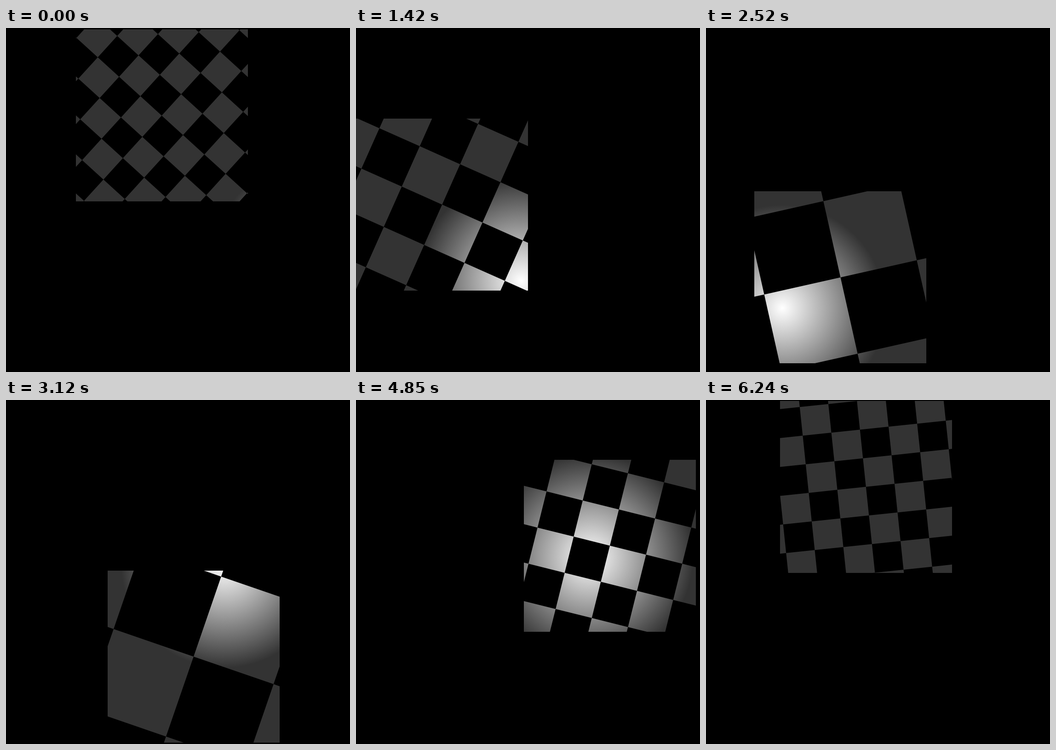
Write an HTML page with a canvas that moves like this. It is 748x748 px and loops after 6.27 s.

```html
<!DOCTYPE html>
<html>
<head>
<meta charset="utf-8">
<style>
html, body { margin: 0; width: 100%; height: 100%; overflow: hidden; background: #000; }
canvas { display: block; }
</style>
</head>
<body>
<canvas id="stage" width="748" height="748"></canvas>
<script>
const ctx = document.getElementById('stage').getContext('2d');
const LOOP = 6270, LAST = 187, SIZE = 748, HALF = 187;

// Path of the light: step, x, y
const light = [
  [0, 673, 510], [43, 359, 550], [75, 166, 609], [94, 475, 358],
  [124, 650, 396], [166, 380, 326], [187, 640, 590]
];

// Steps last 30 ms; every tenth one is held twice as long.
const startOf = n => 10 * Math.round(3 * n + 10 / 3 * Math.floor((n + 5) / 10));

function stepAt(ms) {
  let n = LAST;
  while (n > 0 && startOf(n) > ms) n--;
  return n;
}

function slope(i, k) {
  const a = light[Math.max(i - 1, 0)], b = light[Math.min(i + 1, light.length - 1)];
  return (b[k] - a[k]) / (b[0] - a[0]);
}

// Cubic Hermite curve through the light's points
function lightAt(n) {
  let i = 0;
  while (i < light.length - 2 && n >= light[i + 1][0]) i++;
  const a = light[i], b = light[i + 1], span = b[0] - a[0], u = (n - a[0]) / span;
  const ease = u * u * (3 - 2 * u);
  return [1, 2].map(k =>
    a[k] + (b[k] - a[k]) * ease +
    span * u * (1 - u) * ((1 - u) * slope(i, k) - u * slope(i + 1, k)));
}

function draw(n) {
  const sec = n / 30, phase = 0.1905 + sec;
  const cx = SIZE / 2 - HALF * Math.sin(phase);
  const cy = SIZE / 2 - HALF * Math.cos(phase);
  const cell = HALF / (2 + Math.cos(phase));
  const [lx, ly] = lightAt(n);

  ctx.fillStyle = '#000';
  ctx.fillRect(0, 0, SIZE, SIZE);
  ctx.save();
  ctx.beginPath();
  ctx.rect(Math.round(cx - HALF), Math.round(cy - HALF), 2 * HALF, 2 * HALF);
  ctx.clip();

  // Checkerboard turning and zooming about the window's centre
  ctx.translate(cx, cy);
  ctx.rotate((42.35 + 50 * sec) * Math.PI / 180);
  ctx.beginPath();
  for (let i = -5; i < 5; i++)
    for (let j = -5; j < 5; j++)
      if ((i + j) & 1) ctx.rect(i * cell, j * cell, cell, cell);

  ctx.setTransform(1, 0, 0, 1, 0, 0);
  const glow = ctx.createRadialGradient(lx, ly, 0, lx, ly, 1.2 * HALF);
  glow.addColorStop(0, '#fff');
  glow.addColorStop(1, '#333');
  ctx.fillStyle = glow;
  ctx.fill();
  ctx.restore();
}

const begin = performance.now();
function tick() {
  draw(stepAt((performance.now() - begin) % LOOP));
  requestAnimationFrame(tick);
}
tick();
</script>
</body>
</html>
```
